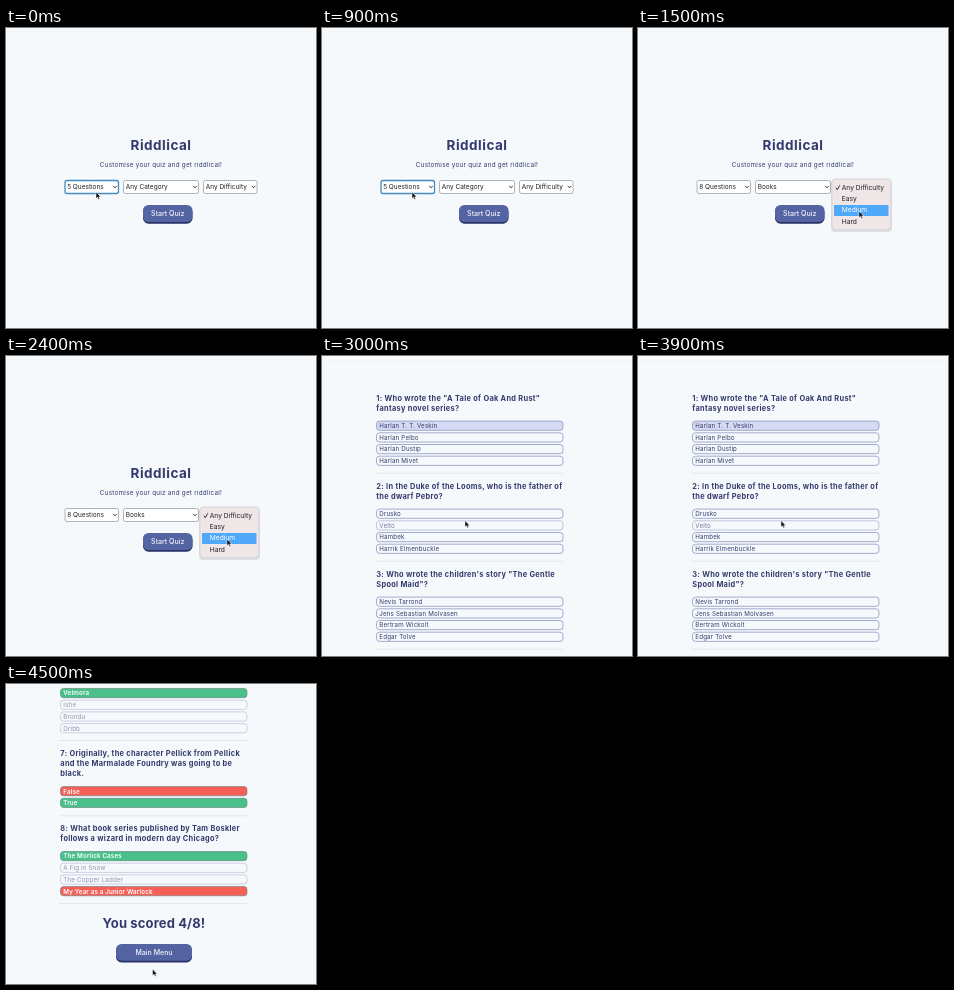
These frames come from a looping animation (310x300 px, 6 s). An HTML page:

```html
<!DOCTYPE html>
<html lang="en">
<head>
<meta charset="utf-8">
<title>Quiz</title>
<style>
html, body { margin: 0; width: 100%; height: 100%; overflow: hidden; background: #f5f9fc; }
svg { display: block; width: 100%; height: 100%; }
text { font-family: Inter, "Open Sans", sans-serif; }
</style>
</head>
<body>
<svg id="stage" viewBox="0 0 310 300"></svg>
<script>
const INK = '#343a6c', BLUE = '#5463a2', EDGE = '#6d78ae', PALE = '#d6dbf3', GREEN = '#49c08a', RED = '#f55f56';
const LEFT = 54.5, WIDTH = 186.5, PITCH = 11.7;

const rect = (x, y, w, h, r, fill, stroke = 'none', sw = 0.7) =>
  `<rect x="${x}" y="${y}" width="${w}" height="${h}" rx="${r}" fill="${fill}" stroke="${stroke}" stroke-width="${sw}"/>`;

const text = (x, y, size, s, { fill = INK, weight = 400, anchor = 'start', gap = 0 } = {}) =>
  `<text x="${x}" y="${y}" font-size="${size}" fill="${fill}" font-weight="${weight}" text-anchor="${anchor}" letter-spacing="${gap}">${s}</text>`;

const line = (d, color, sw) =>
  `<path d="${d}" fill="none" stroke="${color}" stroke-width="${sw}" stroke-linecap="round" stroke-linejoin="round"/>`;

const cursor = (x, y) =>
  `<path transform="translate(${x} ${y})" d="M0 0V6.6L1.5 5.3L2.5 7.6L3.7 7.1L2.7 4.9H4.7Z" fill="#111" stroke="#fff" stroke-width=".5"/>`;

const button = (x, y, w, h, s) =>
  rect(x, y + 1.7, w, h, 5.5, '#293264') + rect(x, y, w, h, 5.5, BLUE) +
  text(x + w / 2, y + 10.9, 7, s, { fill: '#f5f7fb', weight: 500, anchor: 'middle' });

const select = (x, w, s, focused) =>
  rect(x, 152.5, w, 13, 2, '#fff', focused ? '#468bc0' : '#929499', focused ? 1.3 : 0.7) +
  text(x + 2.2, 161.2, 6.5, s, { fill: '#222' }) +
  line(`M${x + w - 5} 158.2l1.5 1.6l1.5-1.6`, '#222', 0.9);

const divider = y => line(`M54 ${y}H241`, '#d9dee9', 0.7);

const question = (y, lines) =>
  lines.map((s, i) => text(54.3, y + i * 10, 7.4, s, { weight: 700, gap: 0.3 })).join('');

// Answer states: plain, on (picked), hover, dim, good, bad
function answer(y, s, state) {
  const fill = { on: PALE, good: GREEN, bad: RED }[state];
  const marked = state === 'good' || state === 'bad';
  const opacity = { hover: 0.68, dim: 0.52 }[state] || 1;
  return `<g opacity="${opacity}">` +
    rect(LEFT, y, WIDTH, 9.2, 3, fill || 'none', marked ? '#5f807b' : EDGE, 0.6) +
    text(57.3, y + 6.9, 6.2, s, { fill: marked ? '#fff' : INK, weight: marked ? 600 : 400, gap: 0.17 }) +
    '</g>';
}

const answers = (y, list, states = []) =>
  list.map((s, i) => answer(y + i * PITCH, s, states[i])).join('');

const block = (y, lines, list, states) =>
  question(y, lines) + answers(y + 20.6, list, states) + divider(y + 72.7);

const menu = (count, category, focused) =>
  text(155, 122.2, 13.5, 'Riddlical', { weight: 700, anchor: 'middle', gap: 0.5 }) +
  text(155, 138.7, 6.3, 'Customise your quiz and get riddlical!', { anchor: 'middle', gap: 0.27 }) +
  select(59, 53.5, count, focused) +
  select(117.5, 75, category) +
  select(197.5, 53.5, 'Any Difficulty') +
  button(137, 177, 49.5, 17, 'Start Quiz');

const popup = () =>
  rect(193, 151.5, 61, 52.5, 4, 'rgba(60,50,60,.12)') +
  rect(194, 151, 59, 50.8, 3.5, '#eee6e7', '#cfc8ca', 0.6) +
  rect(196, 177, 54.5, 11, 1, '#50a8fa') +
  line('M198 160l1.3 1.7l2.3-4', '#222', 0.9) +
  ['Any Difficulty', 'Easy', 'Medium', 'Hard'].map((s, i) =>
    text(203.7, 161.9 + i * 11.2, 6.7, s, { fill: i === 2 ? '#fff' : '#222' })).join('');

const quiz = () =>
  rect(0, 0, 310, 4, 0, '#f8fafc') + line('M0 4.3H310', '#ebeff3', 0.6) +
  block(44.5, ['1: Who wrote the "A Tale of Oak And Rust"', 'fantasy novel series?'],
    ['Harlan T. T. Veskin', 'Harlan Pelbo', 'Harlan Dustip', 'Harlan Mivet'], ['on']) +
  block(132.5, ['2: In the Duke of the Looms, who is the father of', 'the dwarf Pebro?'],
    ['Drusko', 'Velto', 'Hambek', 'Harrik Elmenbuckle'], ['', 'hover']) +
  block(220.5, ['3: Who wrote the children\'s story "The Gentle', 'Spool Maid"?'],
    ['Nevis Tarrond', 'Jens Sebastian Molvasen', 'Bertram Wickolt', 'Edgar Tolve']);

const results = () =>
  answers(4.5, ['Velmora', 'Ishe', 'Brondu', 'Dribb'], ['good', 'dim', 'dim', 'dim']) +
  divider(56.5) +
  question(72.2, ['7: Originally, the character Pellick from Pellick',
    'and the Marmalade Foundry was going to be', 'black.']) +
  answers(102.6, ['False', 'True'], ['bad', 'good']) +
  divider(131.8) +
  block(146.9, ['8: What book series published by Tam Boskler', 'follows a wizard in modern day Chicago?'],
    ['The Morlick Cases', 'A Fig in Snow', 'The Copper Ladder', 'My Year as a Junior Warlock'],
    ['good', 'dim', 'dim', 'bad']) +
  text(148, 244.2, 13, 'You scored 4/8!', { weight: 700, anchor: 'middle', gap: 0.13 }) +
  button(110, 260, 76, 16.7, 'Main Menu');

const scenes = [
  menu('5 Questions', 'Any Category', true) + cursor(90, 164),
  menu('8 Questions', 'Books') + popup() + cursor(221, 183),
  quiz() + cursor(143, 164.5),
  results() + cursor(146.5, 285)
];

const stage = document.getElementById('stage');
stage.innerHTML = scenes.map(s => `<g visibility="hidden">${s}</g>`).join('');
const groups = [...stage.children];
const start = performance.now();

function tick() {
  const now = Math.floor((performance.now() - start) % 6000 / 1500);
  groups.forEach((g, i) => g.setAttribute('visibility', i === now ? 'visible' : 'hidden'));
  requestAnimationFrame(tick);
}
tick();
</script>
</body>
</html>
```
